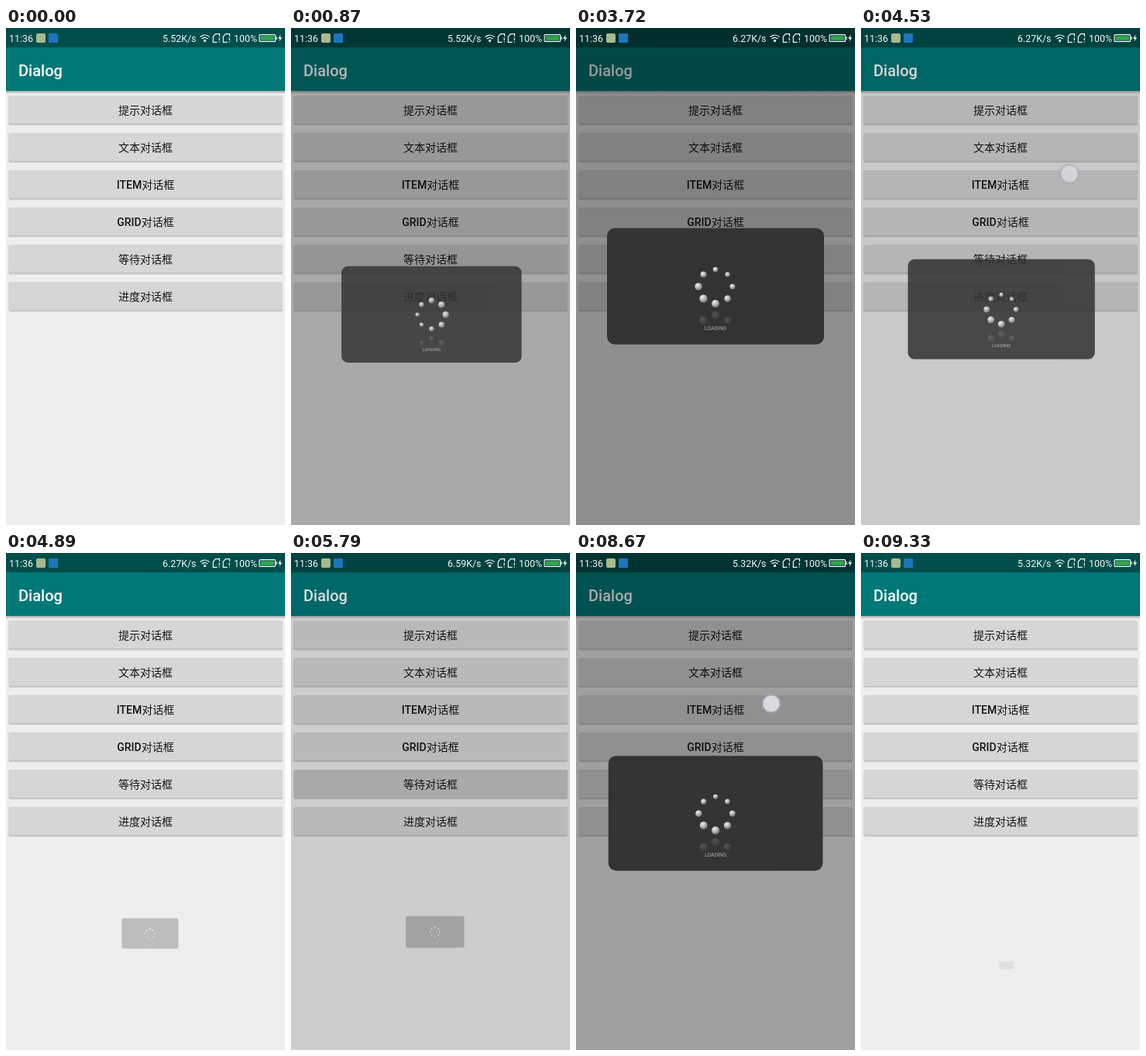
An HTML page for the animation above (9.54 s loop, 360x640 px).

```html
<!DOCTYPE html>
<html lang="zh-CN">
<head>
<meta charset="utf-8">
<style>
  html, body { margin: 0; width: 100%; height: 100%; overflow: hidden; background: #eee; }
  svg { display: block; font-family: Roboto, "Noto Sans CJK SC", "Noto Sans CJK", sans-serif; }
  .caption { font-size: 14px; font-weight: 500; fill: #161616; text-anchor: middle; }
  .cjk { font-weight: 400; }
  .status { font-size: 12.4px; fill: #f4f8f8; }
  .icon { fill: none; stroke: #f4f8f8; stroke-width: 1.2; }
</style>
</head>
<body>
<svg width="360" height="640" viewBox="0 0 360 640">
  <defs>
    <radialGradient id="ball" cx=".36" cy=".3" r=".75">
      <stop offset="0" stop-color="#f4f4f4"/>
      <stop offset=".5" stop-color="#b4b4b4"/>
      <stop offset="1" stop-color="#686868"/>
    </radialGradient>
    <linearGradient id="shade" x2="0" y2="1">
      <stop offset="0" stop-opacity=".3"/>
      <stop offset="1" stop-opacity="0"/>
    </linearGradient>
  </defs>

  <rect width="360" height="640" fill="#eee"/>
  <rect width="360" height="25" fill="#004e4b"/>
  <rect y="25" width="360" height="56" fill="#007878"/>
  <rect y="81" width="360" height="4" fill="url(#shade)"/>
  <text x="16" y="61.5" font-size="20" font-weight="500" fill="#fff">Dialog</text>
  <g id="buttons"></g>
  <rect id="dim" width="360" height="640"/>

  <g id="dialog">
    <rect x="40" y="257.8" width="280" height="149.7" rx="10" fill="#333"/>
    <g id="balls"></g>
    <text x="180" y="389" font-size="6.8" fill="#b0b0b0" text-anchor="middle">LOADING</text>
  </g>

  <g class="status">
    <text x="4" y="17.5">11:36</text>
    <text id="speed" x="202" y="17.5"></text>
    <text x="294" y="17.5">100%</text>
  </g>
  <rect x="39" y="7" width="12" height="12" rx="2" fill="#a8b98c"/>
  <rect x="55" y="7" width="12" height="12" rx="1" fill="#1b76bd"/>
  <g class="icon">
    <path d="M250.5 11.5q6-5 12 0M252.6 14q3.9-3.2 7.8 0"/>
    <circle cx="256.5" cy="16.4" r="1" fill="#f4f8f8"/>
    <path id="sim" d="M275.5 11V7.7H270.5L267.3 11V18.3H272.5M275.2 12.5V16M275.2 17.2V18.6"/>
    <use href="#sim" x="13"/>
    <rect x="327" y="8.6" width="20.5" height="8.8" rx="1"/>
    <path d="M349 11V15"/>
  </g>
  <rect x="328.6" y="10.2" width="17.3" height="5.6" fill="#2fa84a"/>
  <path d="M354.5 8.5L351 13.7H353.4L352.6 17.5L356.2 12.2H353.8Z" fill="#f4f8f8"/>

  <g id="pointer">
    <circle r="13.5" fill="#a4a4b4" opacity=".4"/>
    <circle r="10.8" fill="#dadae0" stroke="#b4b4c0" stroke-width=".8"/>
  </g>
</svg>
<script>
  const LOOP = 9540, WINDOW_MS = 865, DIM_OUT_MS = 346, DIM = 0.4;
  const PIVOT = { x: 188, y: 545.5 };
  const RUNS = [
    { start: 0, exit: 4321, end: 5040, touch: [269, 188] },
    { start: 5250, exit: 8611, end: 9330, touch: [252, 194] }
  ];
  const SPEEDS = [[0, "5.52"], [1980, "6.27"], [5400, "6.59"], [8550, "5.32"]];
  const LABELS = ["提示", "文本", "ITEM", "GRID", "等待", "进度"];

  const $ = id => document.getElementById(id);
  const clamp = v => Math.min(1, Math.max(0, v));
  const ease = u => (1 - Math.cos(Math.PI * clamp(u))) / 2;

  $("buttons").innerHTML = LABELS.map((label, i) => {
    const y = 87 + 48 * i;
    const box = `x="3.5" width="353.5" rx="2"`;
    const kind = label < "a" ? "" : "cjk";
    return `<rect ${box} y="${y + 0.8}" height="37.6" opacity=".1"/>
      <rect ${box} y="${y + 0.6}" height="36.8" opacity=".13"/>
      <rect ${box} y="${y}" height="36.2" fill="#d6d6d6"/>
      ${i === 4 ? `<rect id="press" ${box} y="${y}" height="36.2"/>` : ""}
      <text class="caption" x="180" y="${y + 23.5}"><tspan class="${kind}">${label}</tspan><tspan class="cjk">对话框</tspan></text>`;
  }).join("");

  // Eight balls on a ring; the lower three have a faint mirror image.
  const balls = [];
  for (let i = 0; i < 8; i++) {
    const angle = i * Math.PI / 4;
    const x = 180 + 22 * Math.sin(angle), y = 333 - 22 * Math.cos(angle);
    const add = (cy, opacity) => {
      const el = document.createElementNS("http://www.w3.org/2000/svg", "circle");
      for (const [k, v] of Object.entries({ cx: x, cy, opacity, fill: "url(#ball)" })) el.setAttribute(k, v);
      $("balls").append(el);
      balls.push({ el, angle });
    };
    add(y, 1);
    if (y > 340) add(725 - y, 0.15);
  }

  function draw(t) {
    const run = t < RUNS[1].start ? RUNS[0] : RUNS[1];
    const now = Math.min(t, run.end);
    const age = now - run.start, entered = (age - 240) / WINDOW_MS, left = now - run.exit;

    const scale = left < 0 ? ease(entered) : 1 - ease(left / WINDOW_MS);
    $("dialog").setAttribute("transform",
      `translate(${PIVOT.x} ${PIVOT.y}) scale(${scale}) translate(${-PIVOT.x} ${-PIVOT.y})`);
    $("dialog").setAttribute("opacity", scale);
    $("dim").setAttribute("opacity", DIM * (left < 0 ? clamp(entered) : 1 - clamp(left / DIM_OUT_MS)));
    $("press").setAttribute("opacity", 0.1 * clamp(Math.min(age / 120, (1000 - age) / 600)));

    $("pointer").setAttribute("transform", `translate(${run.touch})`);
    $("pointer").setAttribute("opacity", left < -220 ? 0 : clamp((450 - left) / 300));

    const phase = (262 + 0.4315 * (t - 2160)) * Math.PI / 180;
    for (const { el, angle } of balls) el.setAttribute("r", 4.2 + 1.05 * Math.cos(angle - phase));

    $("speed").textContent = SPEEDS.filter(s => s[0] <= t).pop()[1] + "K/s";
  }

  const origin = performance.now();
  function tick() {
    draw((performance.now() - origin) % LOOP);
    requestAnimationFrame(tick);
  }
  tick();
</script>
</body>
</html>
```
